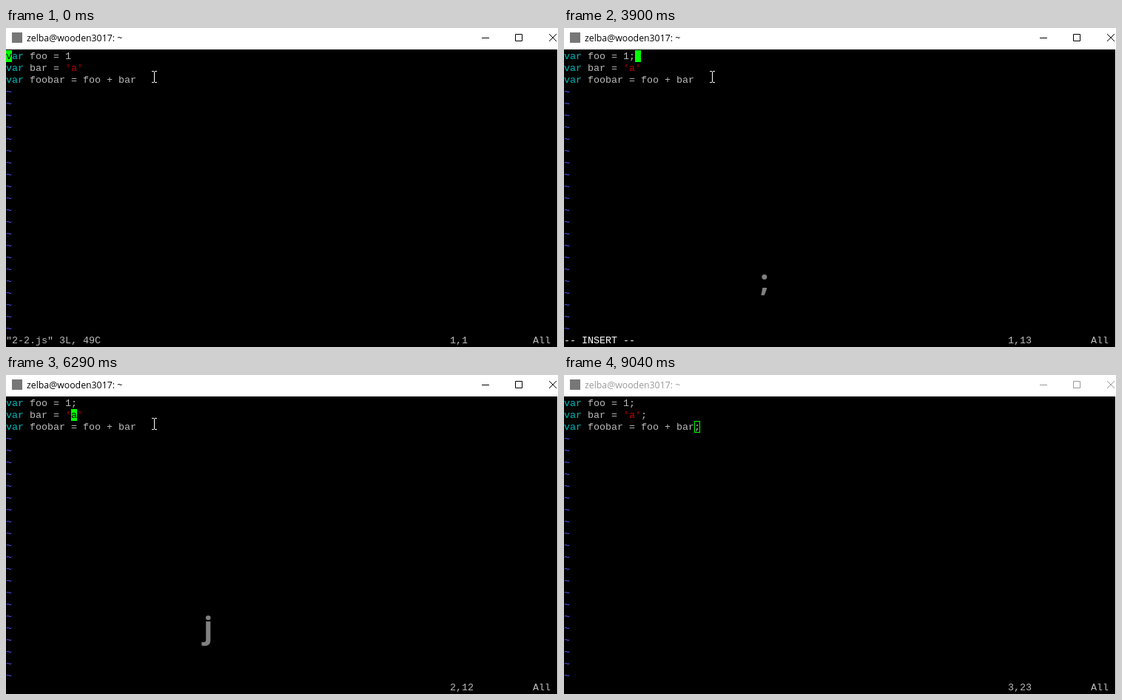
These frames come from a looping animation (746 px wide and 431 px high, 9.14 s). An HTML page:

```html
<!DOCTYPE html>
<html lang="en">
<head>
<meta charset="utf-8">
<title>Terminal editor</title>
<style>
  html, body { margin: 0; width: 100%; height: 100%; overflow: hidden; background: #000; }
  svg { display: block; }
  text { white-space: pre; }
  .term { font: 13.333px "Liberation Mono", monospace; }
  .title { font: 12.3px "Open Sans", sans-serif; }
  .keys { font: bold 41px "Open Sans", sans-serif; }
</style>
</head>
<body>
<svg id="stage" width="746" height="431" viewBox="0 0 746 431"></svg>
<script>
const LOOP = 9140;
const CELL_W = 8, CELL_H = 16, TOP = 30, STATUS_ROW = 25;
const GREY = '#bbb', CYAN = '#00bbbb', RED = '#bb0000', BLUE = '#5555ff', GREEN = '#00ff00';
const KEY_GREY = '#808080', KEY_DIM = '#363636';

const initial = {
  row: 1, col: 1, cursor: true, ruler: true, focused: true,
  semicolons: 0, status: '"2-2.js" 3L, 49C', statusColor: GREY, pending: '',
  keys: '', keyColor: KEY_GREY, pointer: [200, 66]
};

// Each step changes part of the state from its time (ms) on.
const steps = [
  [1650, { col: 12, status: '-- INSERT --', statusColor: '#fff' }],
  [1770, { keys: 'A' }],
  [2140, { keyColor: KEY_DIM }],
  [2290, { keys: '', keyColor: KEY_GREY }],
  [3780, { semicolons: 1, col: 13 }],
  [3900, { keys: ';' }],
  [4300, { keys: ';Escape', status: '', cursor: false, ruler: false, pending: '^[' }],
  [4420, { col: 12, cursor: true, ruler: true, pending: '' }],
  [4880, { keys: '' }],
  [6290, { row: 2, keys: 'j' }],
  [6410, { semicolons: 2, col: 14, keys: 'j.' }],
  [6690, { row: 3, keys: 'j.j' }],
  [7090, { semicolons: 3, col: 23 }],
  [7210, { keys: 'j.j.' }],
  [7640, { keyColor: KEY_DIM }],
  [7790, { keys: '' }],
  [8190, { pointer: [449, 270] }],
  [8340, { pointer: [585, 394] }],
  [8490, { pointer: [660, 424] }],
  [8610, { pointer: null }],
  [9040, { focused: false }]
];

const lines = ['var foo = 1', "var bar = 'a'", 'var foobar = foo + bar'];

const label = (x, y, str, color, cls, extra = '') =>
  `<text class="${cls}" x="${x}" y="${y}" fill="${color}" ${extra}>${str}</text>`;
const rect = (x, y, w, h, attrs) =>
  `<rect x="${x}" y="${y}" width="${w}" height="${h}" ${attrs}/>`;
const cellX = col => (col - 1) * CELL_W;
const cellY = row => TOP + (row - 1) * CELL_H;
const term = (row, col, str, color) => label(cellX(col), cellY(row) + 12, str, color, 'term');

function windowFrame({ focused }) {
  const ink = focused ? '#000' : '#999';
  return rect(0, 0, 746, 431, 'fill="#fff"') +
    rect(0, 29, 745, 402, 'fill="#000"') +
    rect(8, 6, 14, 14, 'fill="#777"') +
    label(28, 18, 'zelba@wooden3017: ~', ink, 'title') +
    `<path d="M643 13.5h10M688.5 8.5h9v9h-9zM734 8l10 10M744 8l-10 10"
      fill="none" stroke="${ink}" stroke-linejoin="bevel"/>`;
}

function codeLine(i, semicolons) {
  const rest = (lines[i] + (i < semicolons ? ';' : '')).slice(3);
  return term(i + 1, 1, 'var', CYAN) +
    term(i + 1, 4, rest.replace(/'.*'/, `<tspan fill="${RED}">$&</tspan>`), GREY);
}

function cursor({ row, col, focused, semicolons }) {
  const x = cellX(col), y = cellY(row);
  if (!focused) return rect(x + .5, y + .5, 7, 15, `fill="none" stroke="${GREEN}"`);
  const line = lines[row - 1] + (row <= semicolons ? ';' : '');
  return rect(x, y, CELL_W, CELL_H, `fill="${GREEN}"`) +
    term(row, col, line[col - 1] || '', '#000');
}

function keyOverlay({ keys, keyColor }) {
  if (keys === ';Escape') {
    return label(265, 363, ';', keyColor, 'keys') +
      rect(281, 317, 141, 61, `rx="4" fill="${keyColor}"`) +
      label(281, 363, 'Escape', '#000', 'keys');
  }
  const spacing = keys[0] === 'j' ? 'letter-spacing="1.3"' : '';
  return label(keys === ';' ? 265 : 267, 356, keys, keyColor, 'keys', spacing);
}

function pointer([x, y]) {
  return `<path d="M${x - 3} ${y - 7.5}h3m1 0h3M${x + .5} ${y - 7}v14M${x - 3} ${y + 7.5}h3m1 0h3"
    fill="none" stroke="#fff"/>`;
}

function draw(state) {
  let out = windowFrame(state);
  lines.forEach((_, i) => out += codeLine(i, state.semicolons));
  for (let row = 4; row < STATUS_ROW; row++) out += term(row, 1, '~', BLUE);
  out += term(STATUS_ROW, 1, state.status, state.statusColor) +
    term(STATUS_ROW, 66, state.pending, GREY);
  if (state.ruler) {
    out += term(STATUS_ROW, 76, `${state.row},${state.col}`, GREY) +
      term(STATUS_ROW, 90, 'All', GREY);
  }
  if (state.cursor) out += cursor(state);
  out += keyOverlay(state);
  if (state.pointer) out += pointer(state.pointer);
  return out;
}

const stage = document.getElementById('stage');
let shown = -1;

function frame() {
  const time = performance.now() % LOOP;
  const past = steps.filter(([at]) => at <= time);
  if (past.length !== shown) {
    shown = past.length;
    stage.innerHTML = draw(Object.assign({}, initial, ...past.map(([, change]) => change)));
  }
  requestAnimationFrame(frame);
}
frame();
</script>
</body>
</html>
```
